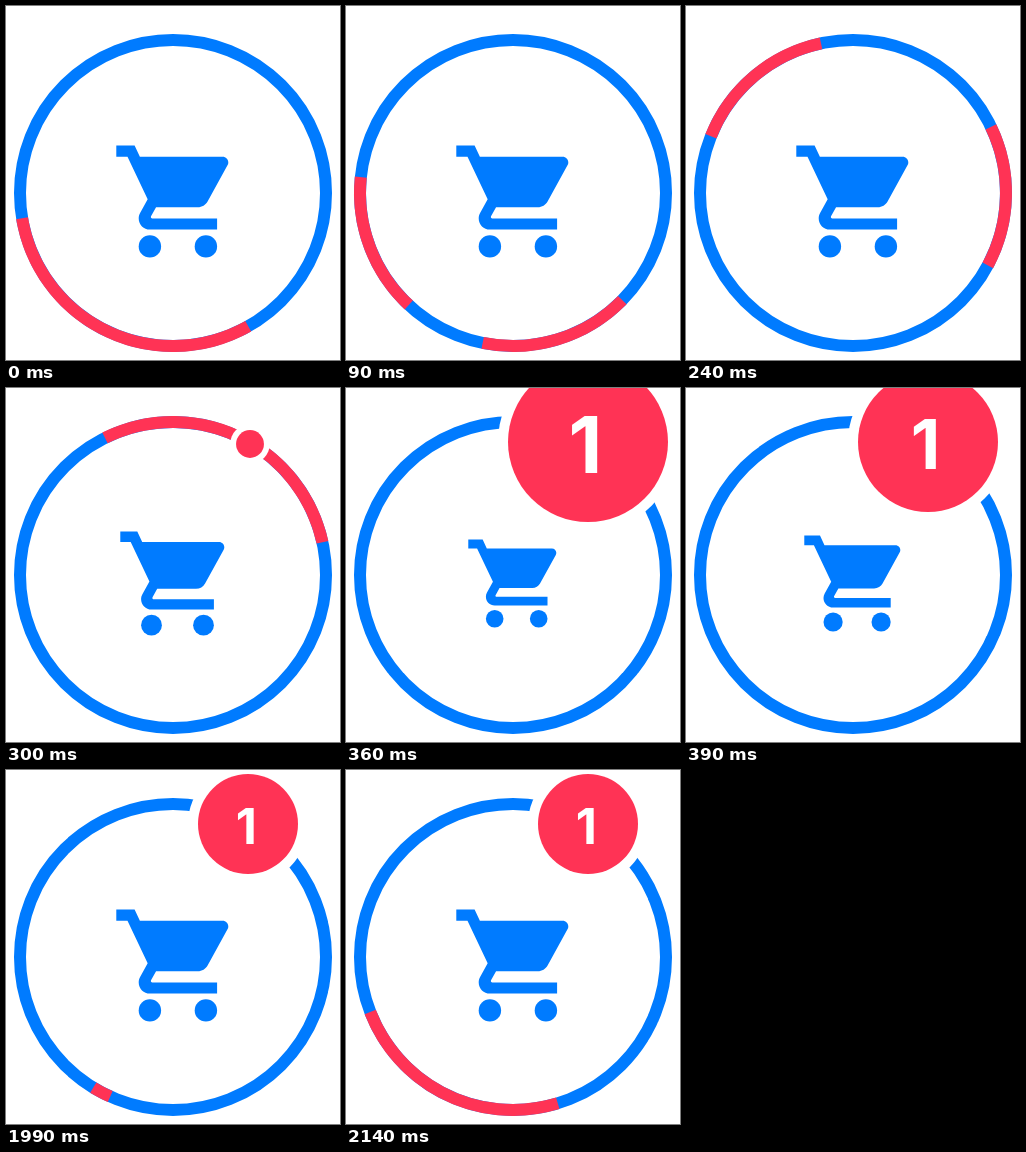
Recreate the animation shown at these times as an HTML page. Size 334 by 354 pixels, loop 2170 ms.

```html
<!DOCTYPE html>
<html lang="en">
<head>
<meta charset="utf-8">
<title>Cart badge</title>
<style>
  html, body { margin: 0; width: 100%; height: 100%; overflow: hidden; background: #fff; }
  svg { display: block; width: 334px; height: 354px; }
  text { font: 700 49px Inter, Roboto, sans-serif; text-anchor: middle; fill: #fff; }
</style>
</head>
<body>
<svg viewBox="0 0 334 354">
  <g fill="none" stroke-width="12">
    <circle cx="167" cy="187" r="153" stroke="#007bff"/>
    <path id="arcs" stroke="#ff3355"/>
  </g>
  <g id="cart" fill="#007bff">
    <circle cx="7" cy="20" r="2"/>
    <circle cx="17" cy="20" r="2"/>
    <path d="M1 2v2h2l3.6 7.59-1.35 2.45c-.16.28-.25.61-.25.96 0 1.1.9 2 2 2h12v-2H7.42c-.14 0-.25-.11-.25-.25l.03-.12.9-1.63h7.45c.75 0 1.41-.41 1.75-1.03l3.58-6.49c.08-.14.12-.31.12-.48 0-.55-.45-1-1-1H5.21l-.94-2z"/>
  </g>
  <g id="badge">
    <circle id="gap" fill="#fff"/>
    <circle id="disc" fill="#ff3355"/>
    <text id="count" x="-1.7" y="19.5">1</text>
  </g>
</svg>
<script>
const LOOP = 2170, STEP = 30, RESTART = 1990;
const POP = 270, PEAK = 360, SETTLED = 450;
const ARC = 55, TRAVEL = 365;
const $ = id => document.getElementById(id);
const clamp = x => Math.min(1, Math.max(0, x));
const progress = (t, from, to) => clamp((t - from) / (to - from));

// Point on the ring, `h` degrees away from the lower-left start; side is 1 or -1.
function ringPoint(h, side) {
  const centre = 118 - 3 * Math.sin(h * Math.PI / 180);
  const a = (centre + side * h) * Math.PI / 180;
  return `${167 + 153 * Math.cos(a)} ${187 + 153 * Math.sin(a)}`;
}

function arcPath(tail, front) {
  if (front <= tail) return '';
  return [1, -1].map(side =>
    `M${ringPoint(tail, side)}A153 153 0 0 ${side > 0 ? 1 : 0} ${ringPoint(front, side)}`
  ).join('');
}

function arcSpan(t) {
  if (t >= RESTART) return [-0.3, ARC * progress(t, 1942, LOOP) ** 1.75];
  if (t >= TRAVEL) return [0, 0];
  const tail = 180 * (t / TRAVEL) ** 1.74;
  return [tail || -0.3, Math.min(180.3, tail + ARC)];
}

function draw(t) {
  const rise = progress(t, POP, PEAK), fall = progress(t, PEAK, SETTLED);

  $('arcs').setAttribute('d', arcPath(...arcSpan(t)));

  const cartScale = 5.6 * (1 - 0.214 * (rise - fall));
  $('cart').setAttribute('transform', `translate(166.3 195.6) scale(${cartScale}) translate(-11 -12)`);

  const r = 80 * rise ** 1.59 - 30 * fall;
  const drift = 3 * (1 - rise);
  $('badge').setAttribute('transform', `translate(${242 + drift} ${54 + drift})`);
  $('disc').setAttribute('r', r);
  $('gap').setAttribute('r', r + Math.min(10, r * 0.42));
  $('count').setAttribute('transform', `scale(${r > 20 ? r / 50 : 0})`);
}

function tick() {
  const t = performance.now() % LOOP;
  const base = t < RESTART ? 0 : RESTART;
  draw(base + Math.floor((t - base) / STEP) * STEP);
  requestAnimationFrame(tick);
}
tick();
</script>
</body>
</html>
```
